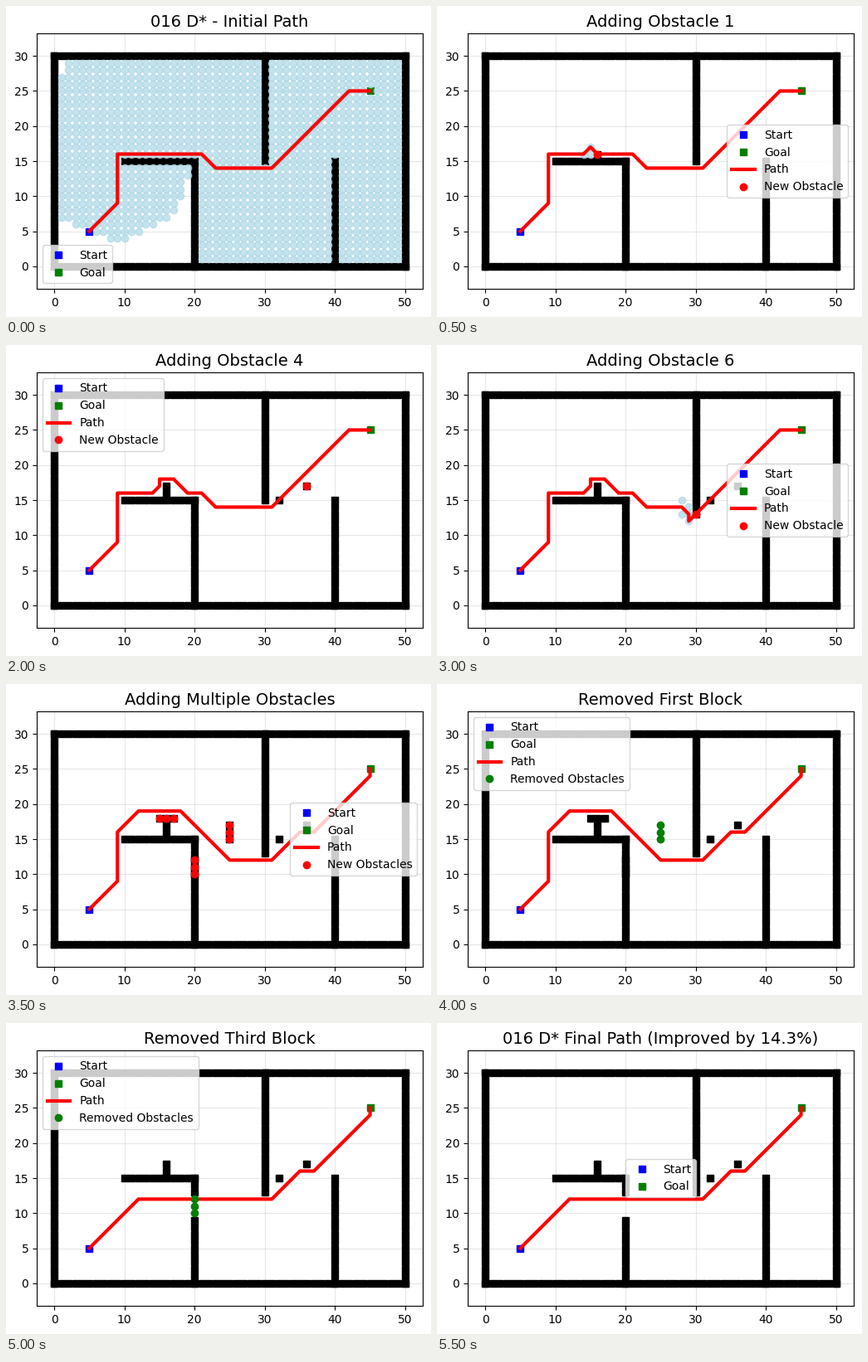
A matplotlib script that plays this animation: 512x375 px, repeating every 6000 ms.

```python
import matplotlib.pyplot as plt
from matplotlib.animation import FuncAnimation

W, H, DPI = 512, 375, 100
AX_W, AX_H = 465, 308
START, GOAL = (5, 5), (45, 25)

plt.rcParams["font.family"] = "DejaVu Sans"
fig = plt.figure(figsize=(W / DPI, H / DPI), dpi=DPI, facecolor="white")
ax = fig.add_axes([37 / W, 34 / H, AX_W / W, AX_H / H])


def column(x, low, high):
    return [(x, y) for y in range(low, high + 1)]


def row(y, low, high):
    return [(x, y) for x in range(low, high + 1)]


WALLS = (row(0, 0, 50) + row(30, 0, 50) + column(0, 0, 30) + column(50, 0, 30)
         + row(15, 10, 20) + column(20, 0, 15) + column(30, 15, 30)
         + column(40, 0, 15))

# Lowest searched cell in columns 1 to 19; the rest is searched to the floor.
SEARCH_FLOOR = [7, 7, 6, 6, 5, 5, 5, 4, 4, 4, 5, 5, 6, 6, 7, 7, 8, 10, 13]


def searched_cells():
    blocked = set(WALLS) | {START, GOAL, (1, 28), (1, 29)}
    floors = SEARCH_FLOOR + [1] * 30
    return [(x, y) for x, low in enumerate(floors, 1)
            for y in range(low, 30) if (x, y) not in blocked]


# Path pieces
LEFT = [START, (9, 9), (9, 16)]
BUMP = [(14, 16), (15, 17), (15, 18), (17, 18), (19, 16)]
MIDDLE = [(21, 16), (23, 14)]
RIGHT = [(31, 14), (42, 25), GOAL]
LOW_RIGHT = [(31, 12), (35, 16), (37, 16), (45, 24), GOAL]

direct = LEFT + MIDDLE + RIGHT
hop = LEFT + [(14, 16), (15, 17), (16, 16)] + MIDDLE + RIGHT
detour = LEFT + BUMP + MIDDLE + RIGHT
dip = LEFT + BUMP + MIDDLE + [(28, 14), (29, 13), (30, 14)] + RIGHT
deep_dip = LEFT + BUMP + MIDDLE + [(28, 14), (29, 13), (29, 12)] + RIGHT
over_block = LEFT + [(12, 19), (18, 19), (25, 12)] + LOW_RIGHT
over_stub = LEFT + [(11, 18), (17, 18), (23, 12)] + LOW_RIGHT
through_gap = [START, (12, 12)] + LOW_RIGHT

# Single obstacles: cell, resulting path, cells searched again
ADDED = [
    ((16, 16), hop, [(14, 16), (15, 16), (15, 17)]),
    ((16, 17), detour, [(14, 17), (15, 16), (15, 17), (15, 18)]),
    ((32, 15), detour, []),
    ((36, 17), detour, []),
    ((30, 14), dip, [(28, 14), (29, 14), (29, 13)]),
    ((30, 13), deep_dip, [(28, 15), (28, 13), (29, 14), (29, 13), (29, 12)]),
]

# Blocks in the order of their removal
BLOCKS = [
    ("First", column(25, 15, 17), over_block),
    ("Second", row(18, 15, 17), over_stub),
    ("Third", column(20, 10, 12), through_gap),
]


def build_scenes():
    scenes = [dict(title="016 D* - Initial Path", cells=WALLS, path=direct,
                   searched=searched_cells(), loc="lower left")]
    cells = list(WALLS)
    for n, (cell, path, searched) in enumerate(ADDED, 1):
        cells = cells + [cell]
        scenes.append(dict(title=f"Adding Obstacle {n}", cells=cells,
                           path=path, searched=searched,
                           loc="upper left" if n == 4 else "center right",
                           marks=([cell], "or", "New Obstacle")))

    blocks = [cell for _, block, _ in BLOCKS for cell in block]
    cells = cells + blocks
    scenes.append(dict(title="Adding Multiple Obstacles", cells=cells,
                       path=over_block, loc="center right",
                       marks=(blocks, "or", "New Obstacles")))

    for name, block, path in BLOCKS:
        cells = [cell for cell in cells if cell not in block]
        scenes.append(dict(title=f"Removed {name} Block", cells=cells,
                           path=path, loc="upper left",
                           marks=(block, "og", "Removed Obstacles")))

    scenes.append(dict(title="016 D* Final Path (Improved by 14.3%)",
                       cells=cells, path=through_gap, loc="center"))
    return scenes


SCENES = build_scenes()


def plot_cells(cells, fmt, **style):
    if cells:
        ax.plot(*zip(*cells), fmt, **style)


def draw(frame):
    scene = SCENES[frame]
    marks = scene.get("marks")
    ax.clear()
    plot_cells(scene["cells"], "sk")
    plot_cells([START], "sb", label="Start")
    plot_cells([GOAL], "sg", label="Goal")
    plot_cells(scene.get("searched"), "o", color="lightblue", alpha=0.7)
    plot_cells(scene["path"], "-r", linewidth=3,
               label="Path" if marks else None)
    if marks:
        cells, fmt, label = marks
        plot_cells(cells, fmt, label=label)

    half_height = 55 * AX_H / AX_W / 2
    ax.set_xlim(-2.5, 52.5)
    ax.set_ylim(15 - half_height, 15 + half_height)
    ax.set_xticks(range(0, 51, 10))
    ax.set_yticks(range(0, 31, 5))
    ax.grid(True, alpha=0.3)
    ax.set_title(scene["title"], fontsize=14)
    ax.legend(loc=scene["loc"])
    return []


anim = FuncAnimation(fig, draw, frames=len(SCENES), interval=500,
                     init_func=lambda: draw(0), repeat=True, repeat_delay=0)
plt.show()
```
